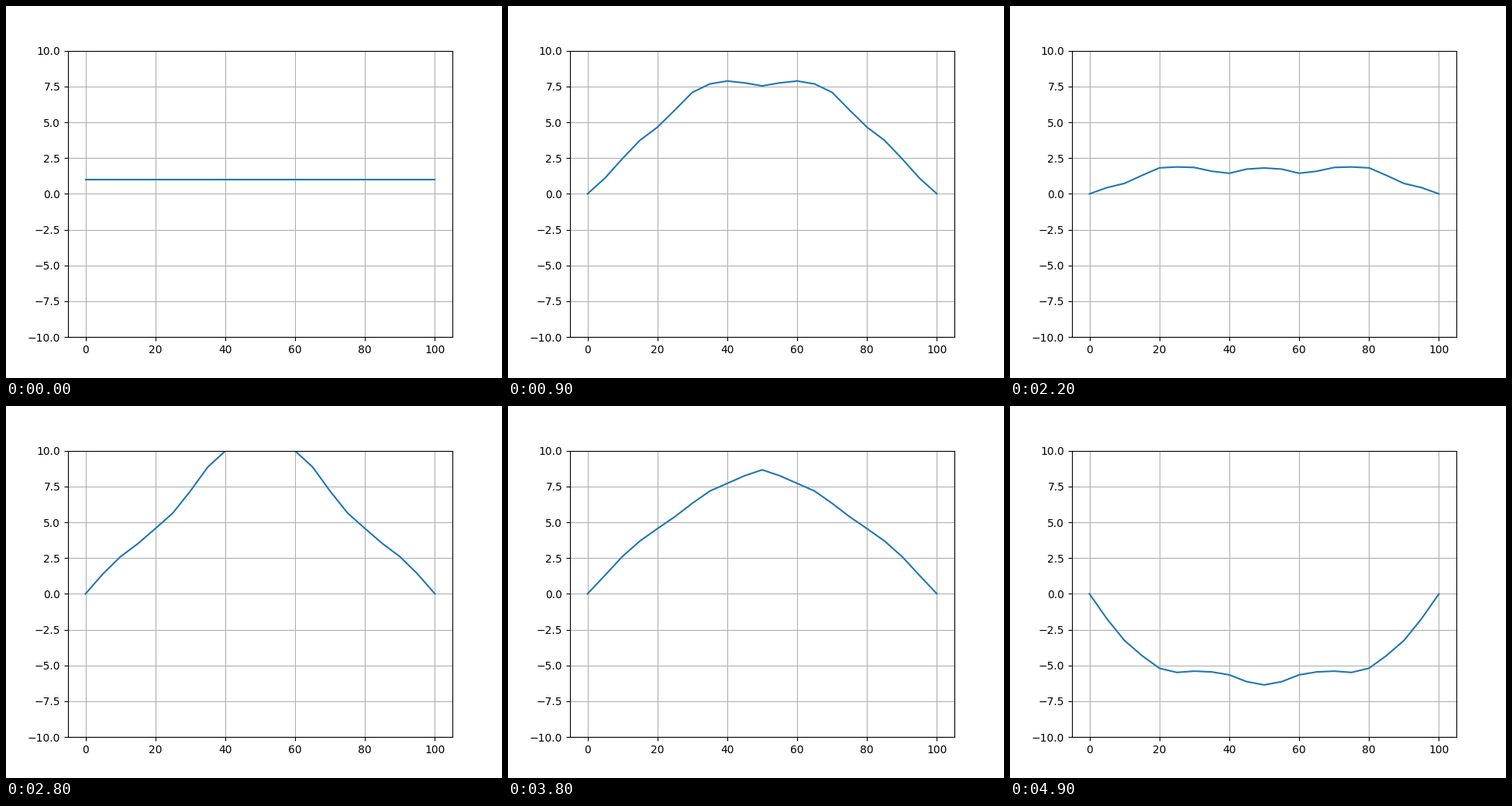
A matplotlib script for the animation above (5 s loop, 640 by 480 pixels).

```python
import numpy as np
import matplotlib.pyplot as plt
from matplotlib.animation import FuncAnimation

FRAMES = 50
INTERVAL = 100          # ms
STEPS_PER_FRAME = 10
SPEED, DT, DX = 343, 0.01, 5
COUPLING = SPEED * DT / DX


def simulate(x, steps):
    """Leapfrog solution of the wave equation with both ends held at zero."""
    u = np.zeros((steps, x.size))
    u[0] = 1
    for n in range(1, steps - 1):
        bend = u[n, 2:] - 2 * u[n, 1:-1] + u[n, :-2]
        u[n + 1, 1:-1] = 2 * u[n, 1:-1] - u[n - 1, 1:-1] + COUPLING * bend
    return u


x = np.arange(0, 100 + DX, DX)
wave = simulate(x, FRAMES * STEPS_PER_FRAME)

fig, ax = plt.subplots(figsize=(6.4, 4.8), dpi=100)
line, = ax.plot(x, wave[0])
ax.set_xlim(-5, 105)
ax.set_ylim(-10, 10)
ax.grid(True)


def update(frame):
    line.set_ydata(wave[frame * STEPS_PER_FRAME])
    return line,


anim = FuncAnimation(fig, update, frames=FRAMES, interval=INTERVAL, repeat=True)
plt.show()
```
